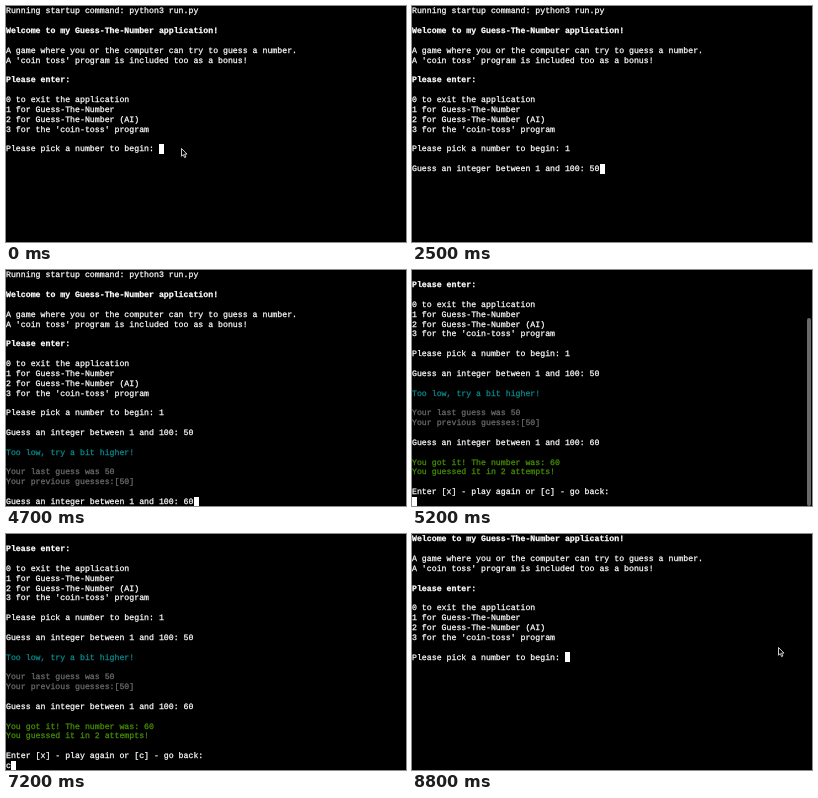
An HTML page that plays this animation: 400x236 px, repeating every 9300 ms.

```html
<!DOCTYPE html>
<html lang="en">
<head>
<meta charset="utf-8">
<title>Guess-The-Number</title>
<style>
html, body { margin: 0; width: 100%; height: 100%; overflow: hidden; background: #000; }
#stage { position: relative; width: 400px; height: 236px; overflow: hidden; background: #000; color: #fff; }
#term div {
  position: absolute; left: 0; height: 9.86px; white-space: pre;
  font: 8.225px/9.86px "Liberation Mono", "Courier New", monospace;
  text-rendering: geometricPrecision; -webkit-text-stroke: .25px currentColor;
}
#term .bold { font-weight: bold; }
#term .cyan { color: #088a8d; }
#term .dim { color: #6c6c6c; }
#term .green { color: #479006; }
#caret { position: absolute; width: 5px; height: 10px; background: #fff; }
#bar { position: absolute; left: 395px; width: 4px; bottom: 0; border-radius: 2px; background: #767676; }
#mouse { position: absolute; width: 8px; height: 11px; overflow: visible; }
</style>
</head>
<body>
<div id="stage">
  <div id="term"></div>
  <div id="caret"></div>
  <div id="bar"></div>
  <svg id="mouse" viewBox="0 0 8 11">
    <path d="M.5 .5V8.2L2.3 6.6 3.6 9.6 4.9 9 3.6 6.1H6Z" fill="#000" stroke="#fff" stroke-width=".8" stroke-linejoin="round"/>
  </svg>
</div>
<script>
const LOOP = 9300, COL = 4.935, ROW = 9.86, TEXT_TOP = 1.2;
const $ = id => document.getElementById(id);
const term = $('term'), caret = $('caret'), bar = $('bar'), mouse = $('mouse');

// A leading "*", "~", "-" or "+" sets the style of a line.
const STYLES = { '*': 'bold', '~': 'cyan', '-': 'dim', '+': 'green' };
const PICK = 'Please pick a number to begin: ';
const ASK = 'Guess an integer between 1 and 100: ';

const menu = [
  '*Welcome to my Guess-The-Number application!', '',
  'A game where you or the computer can try to guess a number.',
  "A 'coin toss' program is included too as a bonus!", '',
  '*Please enter:', '',
  '0 to exit the application',
  '1 for Guess-The-Number',
  '2 for Guess-The-Number (AI)',
  "3 for the 'coin-toss' program", ''
];
const start = ['Running startup command: python3 run.py', '', ...menu];
const picked = [...start, PICK + '1'];
const first = [...picked, '', ASK + '50'];
const hint = [...first, '', '~Too low, try a bit higher!', '',
  '-Your last guess was 50', '-Your previous guesses:[50]', ''];
const won = [...hint, ASK + '60', '', '+You got it! The number was: 60',
  '+You guessed it in 2 attempts!', '', 'Enter [x] - play again or [c] - go back:'];

// The caret always stands after the last line.
const screens = [
  [0, [...start, PICK]],
  [400, picked],
  [900, [...picked, '']],
  [1000, [...picked, '', ASK]],
  [2500, first],
  [2900, [...first, '']],
  [3000, [...hint, '']],
  [3100, [...hint, ASK]],
  [4700, [...hint, ASK + '60']],
  [5200, [...won, '']],
  [7200, [...won, 'c']],
  [7700, [...menu, PICK]]
];
const bars = [
  [0, 0, 0], [5200, 48, .9], [5300, 48, 1], [5700, 48, .45], [5800, 48, 0],
  [7700, 54, .95], [7800, 54, 1], [8200, 54, .7], [8300, 54, .35], [8400, 54, 0]
];
const pointers = [[0, 174.7, 141.6], [300, -20, -20], [8700, 366.2, 112.8]];

const at = (steps, t) => steps.filter(s => s[0] <= t).pop();
let shown;

function print(lines) {
  if (lines === shown) return;
  shown = lines;
  const rows = lines.slice(-24);
  term.replaceChildren(...rows.map((line, i) => {
    const el = document.createElement('div'), style = STYLES[line[0]];
    el.textContent = style ? line.slice(1) : line;
    if (style) el.className = style;
    el.style.top = i * ROW + TEXT_TOP + 'px';
    return el;
  }));
  caret.style.left = rows[rows.length - 1].length * COL + 'px';
  caret.style.top = (rows.length - 1) * ROW + 'px';
}

function draw(now) {
  const t = now % LOOP;
  print(at(screens, t)[1]);
  const [, top, alpha] = at(bars, t);
  bar.style.top = top + 'px';
  bar.style.opacity = alpha;
  const [, x, y] = at(pointers, t);
  mouse.style.left = x + 'px';
  mouse.style.top = y + 'px';
}

const t0 = performance.now();
function tick() {
  draw(performance.now() - t0);
  requestAnimationFrame(tick);
}
tick();
</script>
</body>
</html>
```
